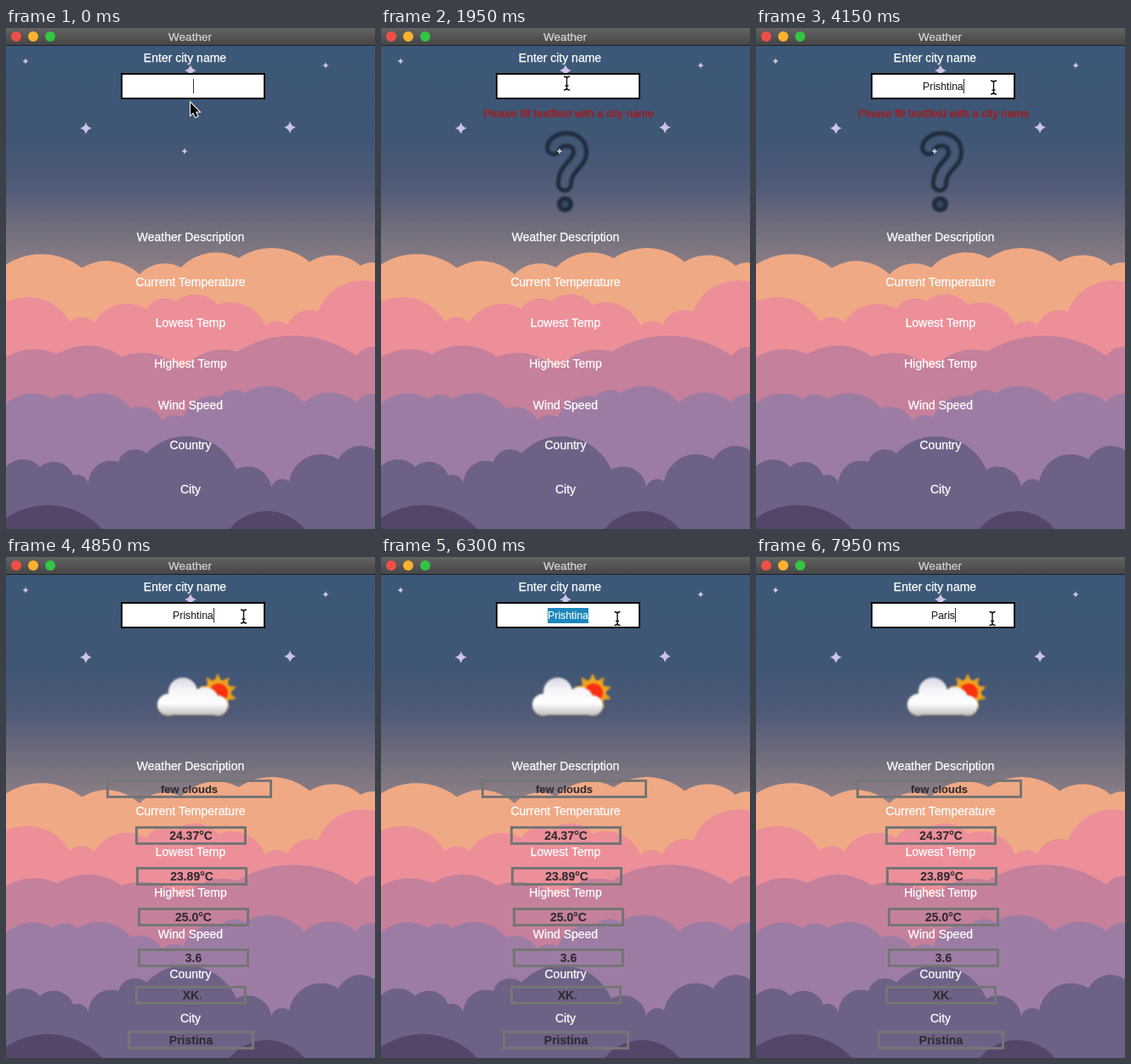
Recreate the animation shown at these times as an HTML page with a canvas. Size 434 px wide and 590 px high, loop 8 s.

```html
<!DOCTYPE html>
<html lang="en">
<head>
<meta charset="utf-8">
<title>Weather</title>
<style>
  html, body { margin: 0; width: 100%; height: 100%; overflow: hidden; background: #3d5878; }
  canvas { display: block; }
</style>
</head>
<body>
<canvas id="stage" width="434" height="590"></canvas>
<script>
const W = 434, H = 590, LOOP = 8000;
const ctx = document.getElementById('stage').getContext('2d');
const SANS = '"Liberation Sans", Arial, sans-serif';
const FIELD_FONT = `12.3px ${SANS}`;

function makeLayer(draw) {
  const layer = document.createElement('canvas');
  layer.width = W;
  layer.height = H;
  draw(layer.getContext('2d'));
  return layer;
}

// Colours are spread evenly from y0 to y1.
function gradient(g, y0, y1, colors) {
  const fill = g.createLinearGradient(0, y0, 0, y1);
  colors.forEach((color, i) => fill.addColorStop(i / (colors.length - 1), color));
  return fill;
}

// A thin outline gives the text its slightly heavy smoothing.
function label(g, text, x, y, font, color, weight = 0.25) {
  g.font = font;
  g.fillStyle = g.strokeStyle = color;
  g.lineWidth = weight;
  g.textAlign = 'center';
  g.fillText(text, x, y);
  g.strokeText(text, x, y);
}

function disc(g, x, y, r, color) {
  g.fillStyle = color;
  g.beginPath();
  g.arc(x, y, r, 0, 7);
  g.fill();
}

// Every pair of neighbouring valleys is joined by an arc as tall as bulge times its chord.
function cloudBank(g, color, bulge, valleys) {
  let [x, y] = valleys[0];
  let path = `M${x} ${H}L${x} ${y}`;
  for (const [nx, ny] of valleys.slice(1)) {
    const chord = Math.hypot(nx - x, ny - y);
    const r = chord * (1 + 4 * bulge * bulge) / (8 * bulge);
    path += `A${r} ${r} 0 0 1 ${nx} ${ny}`;
    [x, y] = [nx, ny];
  }
  g.fillStyle = color;
  g.fill(new Path2D(`${path}L${x} ${H}Z`));
}

function star(g, x, y, r) {
  const k = r * 0.2;
  g.fillStyle = '#cdc3e2';
  g.beginPath();
  g.moveTo(x, y - r);
  g.quadraticCurveTo(x + k, y - k, x + r, y);
  g.quadraticCurveTo(x + k, y + k, x, y + r);
  g.quadraticCurveTo(x - k, y + k, x - r, y);
  g.quadraticCurveTo(x - k, y - k, x, y - r);
  g.fill();
}

const rows = [
  { name: 'Weather Description', y: 251, value: 'few clouds', x: 215.5, top: 262, width: 195, size: 13 },
  { name: 'Current Temperature', y: 304, value: '24.37°C', x: 217.5, top: 317 },
  { name: 'Lowest Temp', y: 352, value: '23.89°C', x: 218.5, top: 365 },
  { name: 'Highest Temp', y: 400, value: '25.0°C', x: 220.5, top: 413 },
  { name: 'Wind Speed', y: 449, value: '3.6', x: 220.5, top: 461 },
  { name: 'Country', y: 496, value: 'XK', x: 217.5, top: 505 },
  { name: 'City', y: 548, value: 'Pristina', x: 217.5, top: 558, width: 149 }
];

const scene = makeLayer(g => {
  g.fillStyle = gradient(g, 21, 290,
    ['#3c5878', '#3e5776', '#405675', '#4e5a77', '#716d7d', '#8f8187']);
  g.fillRect(0, 0, W, H);

  [[217, 50], [94, 118], [334, 117]].forEach(([x, y]) => star(g, x, y, 7));
  [[23, 39], [376, 44]].forEach(([x, y]) => star(g, x, y, 3.6));

  cloudBank(g, '#f0a985', 0.17, [[-5, 282], [89, 282.5], [157, 290], [206, 282],
    [274, 271], [357, 275.5], [417, 280], [445, 282]]);
  cloudBank(g, '#ec8f99', 0.21, [[-5, 325], [75, 346], [104, 347], [165, 331],
    [200, 322], [249, 326], [305, 351], [331, 350], [367, 334], [440, 301]]);
  cloudBank(g, '#c5809b', 0.15, [[-8, 394], [60, 384], [136, 387], [207, 402],
    [272, 381], [412, 386], [440, 376]]);
  cloudBank(g, '#9d7ca3', 0.19, [[-5, 448], [55, 437], [84, 437], [147, 448],
    [184, 462], [208, 459], [252, 434], [281, 430], [350, 441], [412, 441], [440, 433]]);
  cloudBank(g, '#6e6186', 0.27, [[-5, 524], [40, 517], [79, 527], [97, 539],
    [132, 511], [165, 501], [271, 520], [312, 541], [333, 534], [391, 508], [440, 503]]);
  cloudBank(g, '#554669', 0.22, [[-15, H], [113, H]]);
  cloudBank(g, '#554669', 0.24, [[263, H], [351, H]]);

  g.fillStyle = gradient(g, 0, 20, ['#636363', '#464646']);
  g.fillRect(0, 0, W, 20);
  g.fillStyle = '#1c2128';
  g.fillRect(0, 20, W, 1);
  ['#f04f47', '#fcb22f', '#33c544'].forEach((color, i) => disc(g, 12 + 20 * i, 10, 6, color));
  label(g, 'Weather', 216.5, 15, `13.5px ${SANS}`, '#d4d4d4');

  g.fillStyle = '#000';
  g.fillRect(135, 53, 170, 31);
  g.fillStyle = '#fff';
  g.fillRect(137, 55, 166, 27);

  label(g, 'Enter city name', 210.5, 40, `14px ${SANS}`, '#fff');
  rows.forEach(({ name, y }) => label(g, name, 217, y, `14px ${SANS}`, '#fff'));
});

const questionMark = makeLayer(g => {
  const hook = new Path2D('M203 141C206 128 233 127 234 145C235 160 216 163 216 184');
  g.lineCap = 'round';
  g.strokeStyle = '#1f2c3c';
  g.filter = 'blur(1.2px)';
  g.lineWidth = 20;
  g.stroke(hook);
  g.globalCompositeOperation = 'destination-out';
  g.lineWidth = 10;
  g.stroke(hook);
  g.globalCompositeOperation = 'source-over';
  disc(g, 216.5, 207.5, 9.5, '#1f2c3c');
  disc(g, 216.5, 207.5, 4, '#3a4a60');
});

const fewClouds = makeLayer(g => {
  g.filter = 'blur(0.9px)';
  g.fillStyle = '#e9a023';
  g.beginPath();
  for (let i = 0; i < 20; i++) {
    const a = i * Math.PI / 10 - Math.PI / 2;
    const r = i % 2 ? 14.5 : 23;
    g.lineTo(249 + r * Math.cos(a), 160 + r * Math.sin(a));
  }
  g.fill();
  disc(g, 249, 160, 15, '#f0a51f');
  disc(g, 250, 160, 11, '#f8300f');

  const cloud = new Path2D();
  for (const [x, y, r] of [[191, 174, 13], [208, 159, 17], [234, 169, 16], [249, 175, 12]]) {
    cloud.moveTo(x + r, y);
    cloud.arc(x, y, r, 0, 7);
  }
  cloud.rect(189, 170, 62, 16);
  g.save();
  g.translate(0, 2);
  g.fillStyle = '#5d5a5b';
  g.fill(cloud);
  g.restore();
  g.fillStyle = gradient(g, 142, 187, ['#d9d6e2', '#f6f5f8', '#ffffff', '#bdbdbd']);
  g.fill(cloud);
});

const results = makeLayer(g => {
  for (const { value, x, top, width = 131, size = 14 } of rows) {
    g.strokeStyle = '#757575';
    g.lineWidth = 3;
    g.strokeRect(x - width / 2 + 1.5, top + 1.5, width - 3, 19);
    label(g, value, x, top + 16, `bold ${size}px ${SANS}`, '#302b30', 0.1);
  }
  g.fillRect(228, 519, 1.5, 1.5);
});

const ERROR_AT = 500, RESULT_AT = 4400, SELECT_AT = 5800;
const typing = [
  { word: 'Prishtina', start: 2050, step: 115 },
  { word: 'Paris', start: 6880, step: 170 }
];

function fieldState(t) {
  const entry = t < typing[1].start ? typing[0] : typing[1];
  const count = Math.floor((t - entry.start) / entry.step) + 1;
  const shown = Math.max(0, Math.min(entry.word.length, count));
  let touched = shown ? entry.start + (shown - 1) * entry.step : 0;
  if (t >= RESULT_AT) touched = Math.max(touched, RESULT_AT);
  return {
    text: entry.word.slice(0, shown),
    selected: t >= SELECT_AT && t < typing[1].start,
    caret: (t - touched) % 1000 < 500
  };
}

function drawField(t) {
  const { text, selected, caret } = fieldState(t);
  ctx.font = FIELD_FONT;
  const half = ctx.measureText(text).width / 2;
  if (selected) {
    ctx.fillStyle = '#1b87bd';
    ctx.fillRect(220 - half, 60, half * 2, 18);
  }
  label(ctx, text, 220, 73, FIELD_FONT, selected ? '#fff' : '#222', 0.1);
  if (caret && !selected) {
    ctx.fillStyle = '#333';
    ctx.fillRect(Math.round(219.6 + half), 60, 1, 17);
  }
}

const moves = [
  { start: 120, end: 420, x: 218, y: 65 },
  { start: 3450, end: 4150, x: 279, y: 70 },
  { start: 5200, end: 5650, x: 277.5, y: 72.5 }
];

function pointerAt(t) {
  let x = 217, y = 88;
  for (const m of moves) {
    const u = Math.max(0, Math.min(1, (t - m.start) / (m.end - m.start)));
    const k = u * u * (3 - 2 * u);
    x += (m.x - x) * k;
    y += (m.y - y) * k;
  }
  return [x, y];
}

const arrow = new Path2D('M0 0V14.5L3.3 11.5L5.8 17L8.4 15.8L6 10.4H10.4Z');
const beam = new Path2D('M-3.5 -8Q0 -8 0 -5.5Q0 -8 3.5 -8M0 -6V6M-3.5 8Q0 8 0 5.5Q0 8 3.5 8M-2 3H2');

function drawPointer(t) {
  const [x, y] = pointerAt(t);
  ctx.save();
  ctx.translate(x, y);
  ctx.strokeStyle = '#fff';
  if (y > 83) {
    ctx.lineWidth = 2;
    ctx.stroke(arrow);
    ctx.fillStyle = '#000';
    ctx.fill(arrow);
  } else {
    ctx.translate(0.5, 0);
    ctx.lineWidth = 3;
    ctx.stroke(beam);
    ctx.strokeStyle = '#111';
    ctx.lineWidth = 1.4;
    ctx.stroke(beam);
  }
  ctx.restore();
}

function draw(t) {
  ctx.drawImage(scene, 0, 0);
  if (t >= RESULT_AT) {
    ctx.drawImage(fewClouds, 0, 0);
    ctx.drawImage(results, 0, 0);
  } else {
    if (t >= ERROR_AT) {
      ctx.drawImage(questionMark, 0, 0);
      label(ctx, 'Please fill textfield with a city name', 220.5, 105, `13px ${SANS}`, '#b01414');
    }
    star(ctx, 210, 145, 3.6);
  }
  drawField(t);
  drawPointer(t);
}

const began = performance.now();
function tick() {
  draw((performance.now() - began) % LOOP);
  requestAnimationFrame(tick);
}
tick();
</script>
</body>
</html>
```
